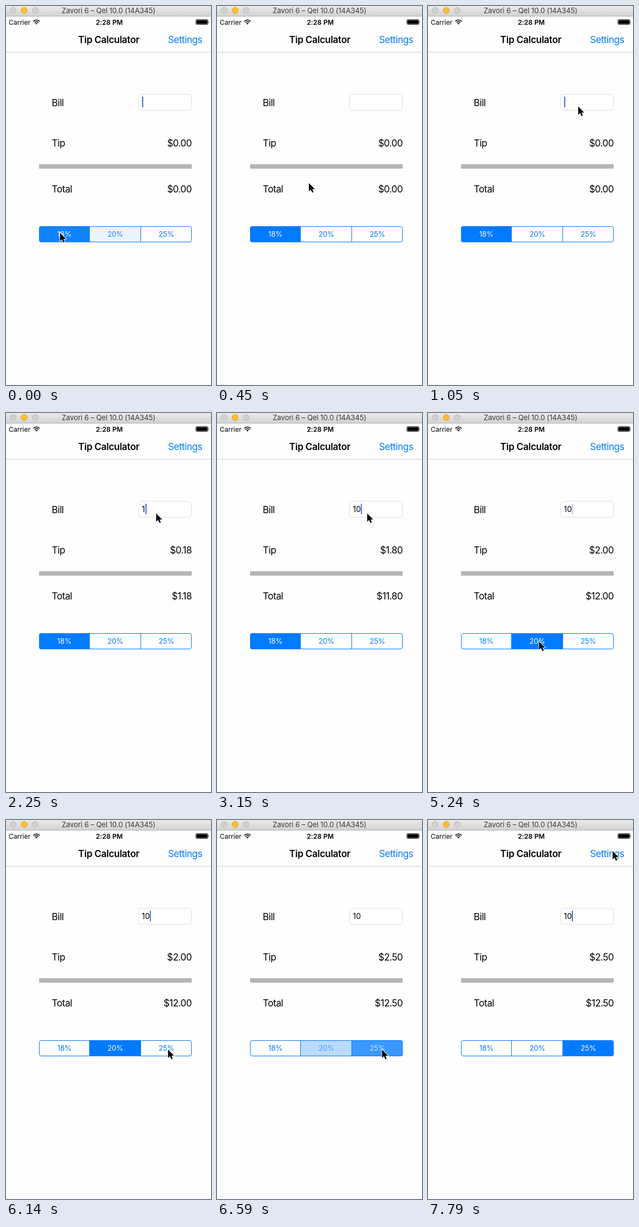
These frames come from a looping animation (372x685 px, 8000 ms). An HTML page:

```html
<!DOCTYPE html>
<html lang="en">
<head>
<meta charset="utf-8">
<title>Tip Calculator</title>
<style>
  html, body { margin: 0; width: 100%; height: 100%; overflow: hidden; background: #fefefe; }
  svg { display: block; }
  text { font: 17px Inter, "Open Sans", sans-serif; letter-spacing: -.42px; white-space: pre; }
  .mid { text-anchor: middle; }
  .end { text-anchor: end; letter-spacing: -.5px; }
  .semi { font-weight: 600; letter-spacing: -.28px; }
  .status { font-size: 12px; letter-spacing: 0; }
  .window { font-size: 13px; letter-spacing: -.1px; fill: #3c3c3c; }
  .field { font-size: 14px; letter-spacing: 0; }
  .pick { font-size: 13px; letter-spacing: -.1px; }
</style>
</head>
<body>
<svg width="372" height="685" viewBox="0 0 372 685">
  <defs>
    <linearGradient id="chrome" x2="0" y2="1">
      <stop stop-color="#ebebeb"/><stop offset="1" stop-color="#d2d2d2"/>
    </linearGradient>
    <clipPath id="round"><rect x="60" y="398" width="277" height="29" rx="4"/></clipPath>
  </defs>

  <rect width="372" height="18" fill="url(#chrome)"/>
  <path d="M0 18.5H372" stroke="#b4b4b4"/>
  <g fill="#d0d0d0" stroke="#bdbdbd">
    <circle cx="13" cy="8" r="5.5"/>
    <circle cx="33" cy="8" r="5.5" fill="#ffbf2f" stroke="#e2a32a"/>
    <circle cx="53" cy="8" r="5.5"/>
  </g>
  <text class="window mid" x="186" y="13">Zavori 6 – Qel 10.0 (14A345)</text>

  <text class="status" x="5" y="33.5">Carrier</text>
  <g fill="none" stroke="#000" stroke-width="1.7">
    <path d="M49.6 27.6a8 8 0 0 1 11.3 0M51.8 29.8a4.9 4.9 0 0 1 6.9 0"/>
    <path d="M55.25 33.6l-2-2.1a2.8 2.8 0 0 1 4 0z" fill="#000" stroke="none"/>
  </g>
  <text class="status mid semi" x="187.5" y="33.5" style="letter-spacing:.1px">2:28 PM</text>
  <rect x="344.5" y="24.5" width="22" height="9" rx="2" fill="none" stroke="#000" stroke-width=".8"/>
  <rect x="345.5" y="25.5" width="20" height="7" rx="1"/>
  <path d="M367.6 27.2q1.6 1.8 0 3.6z"/>

  <text class="mid semi" x="186.5" y="67">Tip Calculator</text>
  <text x="294" y="67" fill="#007aff">Settings</text>
  <path d="M0 83.5H372" stroke="#cdcdcd"/>

  <text x="83" y="180.5">Bill</text>
  <text x="83" y="253.5">Tip</text>
  <text x="83" y="336.5">Total</text>
  <rect x="240.5" y="159.5" width="96" height="29" rx="5" fill="#fff" stroke="#dedede"/>
  <text class="field" id="bill" x="246.5" y="179"></text>
  <rect id="caret" y="164" width="2" height="19" fill="#3f65e8"/>
  <text class="end" id="tip" x="337" y="253.5"></text>
  <rect x="60" y="286" width="277" height="8" fill="#b5b5b5"/>
  <text class="end" id="total" x="337" y="336.5"></text>

  <g id="picks" clip-path="url(#round)"></g>
  <path d="M151.5 398V427M244.5 398V427" stroke="#007aff"/>
  <rect x="60.5" y="398.5" width="276" height="28" rx="3.5" fill="none" stroke="#007aff"/>
  <g id="labels"></g>

  <g id="cursor">
    <path d="M.5 1.5V16.5L4 13.2 6.4 18.8 9 17.6 6.6 12.3H11.3Z" fill="#000" opacity=".18"/>
    <path d="M0 0V15L3.5 11.8 5.9 17.3 8.5 16.2 6.1 10.9H10.8Z" stroke="#fff" stroke-width="1.8" paint-order="stroke"/>
  </g>
</svg>
<script>
const LOOP = 8000, TICK = 150;
const $ = id => document.getElementById(id);

// Keys are [tick, value, ...]
const path = [
  [0, 98, 410], [7, 272.5, 181.5], [27, 272.5, 181.5], [30, 204.5, 404.5], [31, 199, 422],
  [33, 201.5, 413], [35, 201.5, 413], [42, 299.5, 415], [47, 299.5, 415], [52, 335, 56]
];
const options = [
  { rate: 18, x: 60, w: 92, mid: 106, keys: [[0, .93], [1, 1], [33, 1], [35, 0]] },
  { rate: 20, x: 152, w: 93, mid: 198.5, keys: [[0, .08], [1, 0], [33, 0], [35, 1], [43, 1], [44, .27], [45, 0]] },
  { rate: 25, x: 245, w: 92, mid: 291, keys: [[43, 0], [44, .77], [45, 1]] }
];
const fades = [2, 14, 22, 29, 35, 42, 49];
const fadeLevels = [.9, .35, 0, 0];

function add(parent, tag, attrs, content = '') {
  const el = document.createElementNS('http://www.w3.org/2000/svg', tag);
  for (const name in attrs) el.setAttribute(name, attrs[name]);
  el.textContent = content;
  return parent.appendChild(el);
}

for (const o of options) {
  o.box = add($('picks'), 'rect', { x: o.x, y: 398, width: o.w, height: 29, fill: '#007aff' });
  o.label = add($('labels'), 'text', { x: o.mid, y: 417, class: 'pick mid' }, o.rate + '%');
}

function at(keys, k) {
  const i = keys.findIndex(key => key[0] > k);
  if (i < 0) return keys[keys.length - 1].slice(1);
  if (i === 0) return keys[0].slice(1);
  const a = keys[i - 1], b = keys[i];
  const u = (k - a[0]) / (b[0] - a[0]), ease = u * u * (3 - 2 * u);
  return a.slice(1).map((v, n) => v + (b[n + 1] - v) * ease);
}

function caretLevel(k) {
  if (k >= 15 && k < 21) return 1; // solid after typing
  const start = fades.find(f => k >= f - 1 && k <= f + 2);
  return start === undefined ? 1 : fadeLevels[k - start + 1];
}

function draw(t) {
  // The screen refreshes in ticks, one of them 10 ms short
  const k = Math.min(52, Math.floor((t < 5090 ? t : t + 10) / TICK));
  const bill = k < 15 ? '' : k < 18 ? '1' : '10';
  const rate = k < 34 ? 18 : k < 44 ? 20 : 25;
  const tip = bill * rate / 100;

  $('bill').textContent = bill;
  $('tip').textContent = '$' + tip.toFixed(2);
  $('total').textContent = '$' + (+bill + tip).toFixed(2);
  $('caret').setAttribute('x', [247, 253, 261][bill.length]);
  $('caret').setAttribute('opacity', caretLevel(k));

  for (const o of options) {
    const [a] = at(o.keys, k);
    o.box.setAttribute('opacity', a);
    o.label.setAttribute('fill', `rgb(${255 * a}, ${122 + 133 * a}, 255)`);
  }
  $('cursor').setAttribute('transform', `translate(${at(path, k)})`);
}

const begin = performance.now();
function frame() {
  draw((performance.now() - begin) % LOOP);
  requestAnimationFrame(frame);
}
frame();
</script>
</body>
</html>
```
